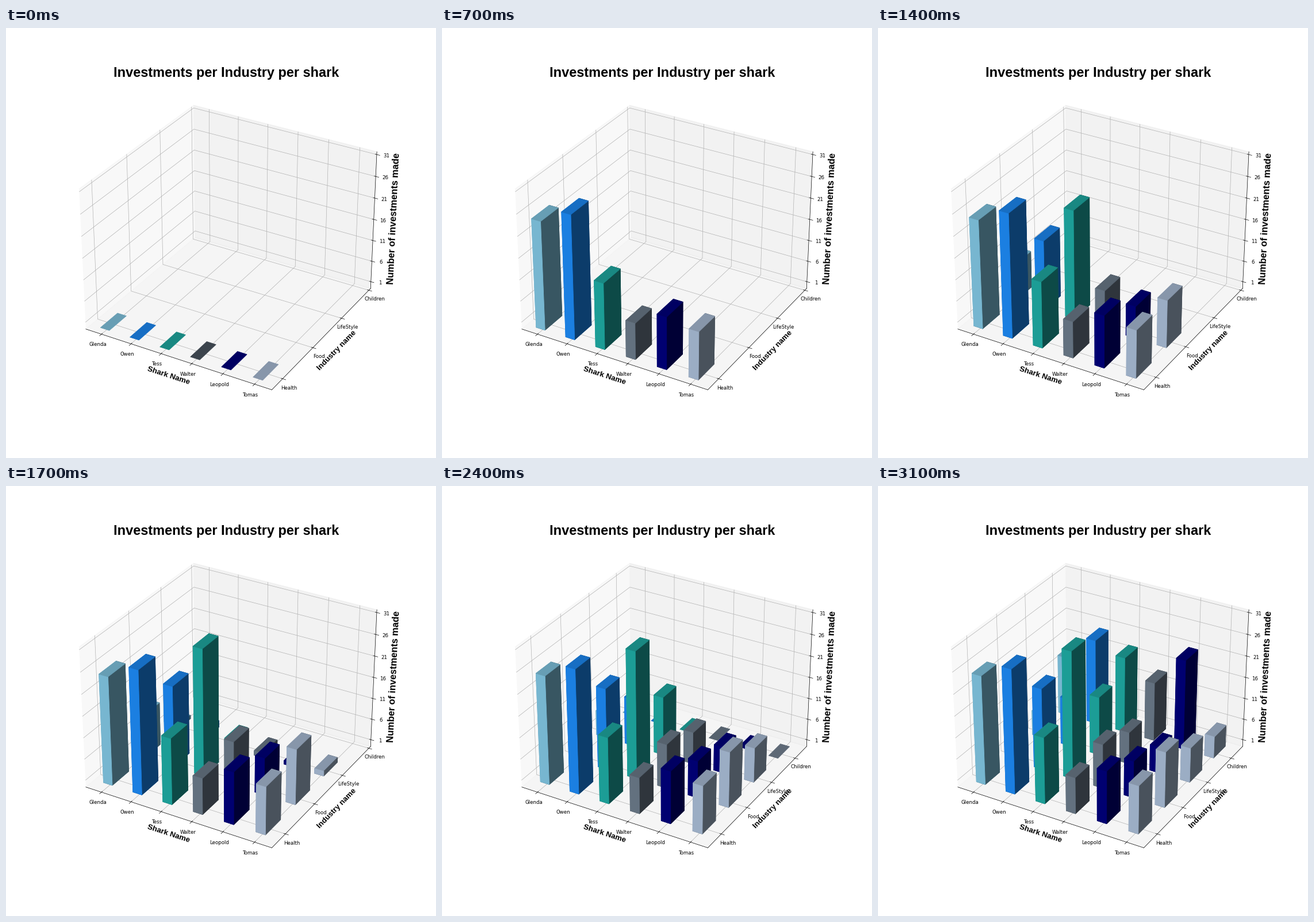
Write a matplotlib script that moves like this. It is 748 px wide and 748 px high and loops after 3.2 s.

```python
import numpy as np
import matplotlib.pyplot as plt
from matplotlib.animation import FuncAnimation
from matplotlib.colors import to_rgb
from mpl_toolkits.mplot3d.art3d import Poly3DCollection

NAMES = ["Glenda", "Owen", "Tess", "Walter", "Leopold", "Tomas"]
INDUSTRIES = ["Health", "Food", "LifeStyle", "Children"]
COLORS = ["skyblue", "dodgerblue", "lightseagreen",
          "slategray", "navy", "lightsteelblue"]
HEIGHTS = [[25.2, 28.7, 15.4, 8.4, 12.15, 11.1],
           [10.1, 19.0, 29.5, 10.3, 8.6, 12.9],
           [5.8, 11.2, 13.7, 7.4, 6.1, 8.1],
           [14.0, 20.0, 17.8, 13.8, 21.1, 5.1]]
STEPS = 8            # frames per industry
DX, DY = 0.3, 0.5    # bar footprint
TOP_SHADE, BOTTOM_SHADE = 0.7667, 0.5333
# flat bars that show their darker underside: (industry, person)
UNDERSIDE = {(0, 3), (3, 5)}

LABEL_FONT = dict(fontfamily="Liberation Sans", fontweight="bold")


def padded(lo, hi):
    pad = (hi - lo) / 48
    return lo - pad, hi + pad


def y_limits(group):
    margin = 0.05 * (group + DY)
    return padded(-DY / 2 - margin, max(3, group + DY / 2 + margin))


fig = plt.figure(figsize=(12, 12), dpi=748 / 12, facecolor="white")
ax = fig.add_subplot(projection="3d", computed_zorder=False)

# 3D axes scale the title height by 0.92; undo that
ax.set_title("Investments per Industry per shark", y=1 / 0.92, fontsize=27.2,
             color="black", **LABEL_FONT)
ax.set_xlabel("Shark Name", fontsize=15.5, **LABEL_FONT)
ax.set_ylabel("Industry name", fontsize=15.5, **LABEL_FONT)
ax.set_zlabel("Number of investments made", fontsize=19, **LABEL_FONT)
ax.set_xticks(range(len(NAMES)), NAMES)
ax.set_yticks(range(len(INDUSTRIES)), INDUSTRIES)
ax.set_zticks(range(1, 32, 5))


def draw_bar(group, person, height):
    color = to_rgb(COLORS[person])
    x, y = person - DX / 2, group - DY / 2
    # far rows first, then left to right
    order = 10 + (len(INDUSTRIES) - group) * len(NAMES) + person
    if height > 0:
        ax.bar3d(x, y, 0, DX, DY, height, color=color, edgecolors=color,
                 shade=True, zorder=order)
        return
    shade = BOTTOM_SHADE if (group, person) in UNDERSIDE else TOP_SHADE
    flat = tuple(np.array(color) * shade)
    corners = [(x, y, 0), (x + DX, y, 0), (x + DX, y + DY, 0), (x, y + DY, 0)]
    ax.add_collection3d(Poly3DCollection([corners], facecolors=[flat],
                                         edgecolors=[flat], zorder=order))


def draw(frame):
    for bar in list(ax.collections):
        bar.remove()
    current, step = divmod(frame, STEPS)
    for group in range(current + 1):
        grown = step / (STEPS - 1) if group == current else 1
        for person, height in enumerate(HEIGHTS[group]):
            draw_bar(group, person, height * grown)
    ax.set_xlim(*padded(-0.415, 5.415))
    ax.set_ylim(*y_limits(current))
    ax.set_zlim(*padded(0, 31))
    return ax.collections


anim = FuncAnimation(fig, draw, frames=STEPS * len(INDUSTRIES), interval=100,
                     repeat=True, repeat_delay=0, blit=False)
plt.show()
```
